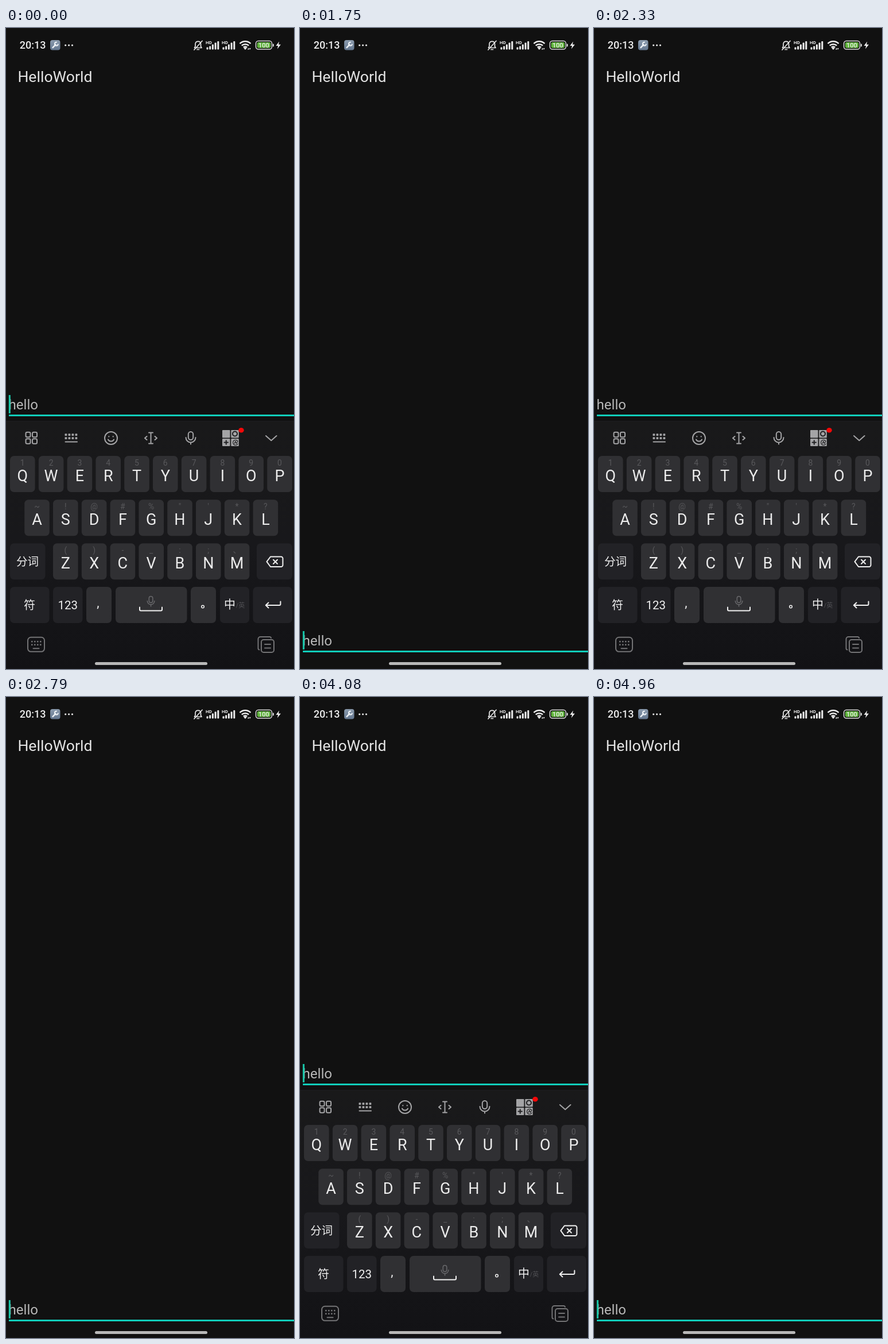
Recreate the animation shown at these times as an HTML page. Size 502 by 1116 pixels, loop 5 s.

```html
<!DOCTYPE html>
<html lang="en">
<head>
<meta charset="utf-8">
<title>Keyboard slide</title>
<style>
  html, body { margin: 0; width: 100%; height: 100%; overflow: hidden; background: #111; }
  svg { display: block; width: 502px; height: 1116px; }
  text { font-family: Roboto, "Noto Sans CJK SC", "Noto Sans CJK", sans-serif; fill: #ececec; }
  .mid { text-anchor: middle; }
  .letter { font-size: 27px; }
  .sub { font-size: 14px; fill: #58585b; }
  .line { fill: none; stroke-linecap: round; stroke-linejoin: round; stroke-width: 2; }
  .tool { stroke: #a4a4a6; }
  .dim { stroke: #737375; }
  .white { stroke: #f0f0f0; }
</style>
</head>
<body>
<svg viewBox="0 0 502 1116">
  <defs>
    <linearGradient id="panel" x2="0" y2="1">
      <stop offset="0" stop-color="#19191a"/><stop offset=".5" stop-color="#18181b"/><stop offset="1" stop-color="#121215"/>
    </linearGradient>
    <linearGradient id="app" x2="0" y2="1">
      <stop offset="0" stop-color="#8b9bae"/><stop offset="1" stop-color="#64778f"/>
    </linearGradient>
  </defs>
  <rect width="502" height="1116" fill="#111"/>

  <text x="23.700" y="36.300" font-size="18" font-weight="500">20:13</text>
  <rect x="77" y="21" width="17.500" height="17.500" rx="4" fill="url(#app)"/>
  <path class="line" d="M81.500 34.200 86.500 29" stroke="#eef2f6" style="stroke-width:2.400"/>
  <path class="line" d="M88 24.800a3 3 0 1 0 2.800 3.600" stroke="#eef2f6"/>
  <g fill="#e8e8e8"><circle cx="103.700" cy="30" r="1.600"/><circle cx="109.600" cy="30" r="1.600"/><circle cx="115.500" cy="30" r="1.600"/></g>
  <path class="line" style="stroke-width:1.700" stroke="#e8e8e8" d="M328.500 34.500h12.500l-1.500-2.500v-4.500a4.800 4.800 0 0 0-9.500 0v4.500zM333 37.500h3.500M342 22.500 328 38"/>
  <g id="signal" fill="#ececec"></g>
  <g class="line" style="stroke-linecap:butt;stroke-width:2.500" stroke="#ececec">
    <path d="M407.500 27.200a13.500 13.500 0 0 1 19 0M410.800 30.700a9 9 0 0 1 12.400 0M413.800 33.800a4.800 4.800 0 0 1 6.400 0"/>
  </g>
  <path d="M414.300 35.200a4 4 0 0 1 5.400 0L417 38zM421 37.500l1.500-3 1.500 3zM424 35l1.300 3 1.300-3z" fill="#ececec"/>
  <rect x="435.500" y="22.500" width="28" height="14.500" rx="4.500" fill="none" stroke="#dedede" stroke-width="1.500"/>
  <rect x="437.800" y="24.800" width="23.400" height="9.900" rx="2.500" fill="#60b53c"/>
  <rect x="465" y="27.500" width="1.900" height="5" rx=".9" fill="#dedede"/>
  <text class="mid" x="449.500" y="33.800" font-size="11" font-weight="500">100</text>
  <path d="M476.200 23.500 470.500 31h3.700l-1.200 5.500 6-7.800h-3.900z" fill="#ececec"/>

  <text x="20.400" y="94" font-size="26.600" style="fill:#e4e4e4">HelloWorld</text>

  <g id="field">
    <text x="4.600" y="664" font-size="24" style="fill:#b8b8b8">hello</text>
    <rect x="5" y="673" width="497" height="3" fill="#10cdba"/>
    <rect id="cursor" x="4.800" y="639" width="3" height="32" fill="#18c8aa"/>
  </g>

  <g id="board">
    <rect y="684" width="502" height="432" fill="url(#panel)"/>
    <rect y="684" width="502" height="1" fill="#1e1e20"/>
    <g id="keys"></g>
    <g class="line tool">
      <g id="tiles"></g>
      <path d="M103.500 720.500h20.500"/>
      <circle cx="183" cy="714" r="11"/>
      <path d="M178 716.500a5.600 5.600 0 0 0 10 0M179.300 711v.4M186.700 711v.4"/>
      <path d="M249 704.500h7M252.500 704.500v19M249 723.500h7M245.500 711l-3.500 3 3.500 3M259.500 711l3.500 3-3.500 3"/>
      <rect x="317.800" y="703" width="8.400" height="14" rx="4.200"/>
      <path d="M313.500 713a8.500 8.500 0 0 0 17 0M322 721.500v3"/>
      <path d="M453 710l9.300 8.300 9.300-8.300"/>
    </g>
    <g id="dots" fill="#a4a4a6"></g>
    <g fill="#a4a4a6">
      <rect x="377" y="700" width="13.500" height="13.500" rx="1"/>
      <rect x="392.300" y="700" width="13.500" height="13.500" rx="1"/>
      <rect x="377" y="715" width="13.500" height="13" rx="1"/>
      <rect x="392.300" y="715" width="13.500" height="13" rx="1"/>
    </g>
    <g class="line" stroke="#202022">
      <circle cx="399" cy="706.500" r="4"/>
      <path d="M380.500 721.500h6.500M383.750 718.200v6.600"/>
      <path style="stroke-width:1.200" d="M404 719.500a4.500 4.500 0 1 0 0 4.500M398 723.500l2-4 1.500 4 2-3"/>
    </g>
    <ellipse cx="410" cy="700.300" rx="4.700" ry="4.300" fill="#f50808"/>

    <g class="line white">
      <path d="M461 920.500h18.500a3 3 0 0 1 3 3v11.500a3 3 0 0 1-3 3H461l-6.500-8.800zM466 925.700l7 7M473 925.700l-7 7"/>
      <path d="M478.500 998.500v4.500a2 2 0 0 1-2 2H453M457.500 1000.500 452.800 1005l4.700 4.500"/>
      <path d="M233 1008.500v4a2 2 0 0 0 2 2h35a2 2 0 0 0 2-2v-4"/>
    </g>
    <g class="line" stroke="#69696c" style="stroke-width:1.500">
      <rect x="249.300" y="989.500" width="6.500" height="11" rx="3.250"/>
      <path d="M246.300 997.500a6.200 6.200 0 0 0 12.500 0M252.500 1004v3"/>
    </g>
    <g class="line dim">
      <rect x="38" y="1060.800" width="29" height="25" rx="5.500"/>
      <path d="M47.500 1080.300h10"/>
      <path d="M441.500 1082.500a2.500 2.500 0 0 1-2-2.500v-16a4 4 0 0 1 4-4h16a2.500 2.500 0 0 1 2.500 2"/>
      <rect x="445" y="1065" width="22" height="22" rx="4"/>
      <path d="M451 1073h10M451 1079.500h10"/>
    </g>
    <g id="dimDots" fill="#737375"></g>
  </g>
  <rect x="155" y="1104" width="196" height="5" rx="2.500" fill="#b8b8b8"/>
</svg>
<script>
const $ = id => document.getElementById(id);

function add(parent, tag, attrs, label) {
  const node = document.createElementNS('http://www.w3.org/2000/svg', tag);
  for (const name in attrs) node.setAttribute(name, attrs[name]);
  if (label) node.textContent = label;
  return parent.appendChild(node);
}

const keys = $('keys'), LIGHT = '#303033', DARK = '#222226';

function key(x, y, width, fill) {
  add(keys, 'rect', { x, y, width, height: 63, rx: 7, fill });
}
function label(x, y, size, str, fill = '#f0f0f0') {
  add(keys, 'text', { x, y, class: 'mid', 'font-size': size, style: `fill:${fill}` }, str);
}
function letterRow(x0, y, letters, subs) {
  [...letters].forEach((ch, i) => {
    const x = x0 + i * 49.8, cx = x + 21.8;
    key(x, y, 43.6, LIGHT);
    add(keys, 'text', { x: cx, y: y + 16.5, class: 'mid sub' }, subs[i]);
    add(keys, 'text', { x: cx, y: y + 43.5, class: 'mid letter' }, ch);
  });
}

letterRow(7, 745, 'QWERTYUIOP', '1234567890');
letterRow(32.2, 821.3, 'ASDFGHJKL', '~!@#%"\'*?');
letterRow(82, 897.3, 'ZXCVBNM', '()-_:;、');

key(7, 897.3, 61.5, DARK);
key(437, 897.3, 62, DARK);
label(37.5, 936, 19.5, '分词');

[[7, 68.5, DARK], [82, 51.5, DARK], [140, 44, LIGHT], [191, 124.5, LIGHT],
 [322, 44, LIGHT], [373, 51, DARK], [430.5, 68.5, DARK]]
  .forEach(([x, width, fill]) => key(x, 973, width, fill));
label(41, 1011.5, 20, '符');
label(107.8, 1012, 20.5, '123');
label(160.5, 1008, 22, ',');
add(keys, 'circle', { cx: 343, cy: 1007.5, r: 2.3, fill: 'none', stroke: '#f0f0f0', 'stroke-width': 1.5 });
label(390, 1011, 20, '中');
label(408.5, 1009, 11, '/英', '#505054');

for (const x of [34.5, 46]) for (const y of [703.7, 715.3])
  add($('tiles'), 'rect', { x, y, width: 8, height: 8.5, rx: 2.3 });
for (let i = 0; i < 4; i++) for (const y of [706.2, 712.2])
  add($('dots'), 'rect', { x: 102.5 + i * 6, y, width: 3.8, height: 3.8, rx: 0.8 });
for (let i = 0; i < 4; i++) for (const y of [1067, 1072.5])
  add($('dimDots'), 'rect', { x: 44 + i * 5, y, width: 2.5, height: 2.5 });

for (const x of [348, 376]) {
  add($('signal'), 'text', { x, y: 27.8, 'font-size': 8, 'font-weight': 700 }, 'HD');
  for (let i = 0; i < 5; i++) {
    const height = [4, 6, 9, 12, 14.5][i];
    add($('signal'), 'rect', { x: x + 1.5 + i * 4.7, y: 37.5 - height, width: 3, height, rx: 1 });
  }
}

const LOOP = 5000, SLIDE = 320, DROP = 432, FIELD_DROP = 411;
// start time, 1 = hide, 0 = show
const moves = [[681, 1], [1840, 0], [2420, 1], [3370, 0], [4100, 1]];

// cubic-bezier(.2, 0, 0, 1)
function ease(x) {
  if (x >= 1) return 1;
  let lo = 0, hi = 1;
  for (let i = 0; i < 24; i++) {
    const u = (lo + hi) / 2;
    if (0.6 * (1 - u) ** 2 * u + u ** 3 < x) lo = u; else hi = u;
  }
  return lo * lo * (3 - 2 * lo);
}

function hiddenAt(t) {
  let level = 0;
  for (const [start, goal] of moves)
    if (t > start) level += (goal - level) * ease((t - start) / SLIDE);
  return level;
}

function draw() {
  const t = performance.now() % LOOP;
  const y = Math.round(hiddenAt(t) * DROP);
  $('board').setAttribute('transform', `translate(0 ${y})`);
  $('field').setAttribute('transform', `translate(0 ${Math.min(y, FIELD_DROP)})`);
  const phase = t % 1000;
  $('cursor').setAttribute('visibility', phase >= 210 && phase < 710 ? 'hidden' : 'visible');
  requestAnimationFrame(draw);
}
draw();
</script>
</body>
</html>
```
